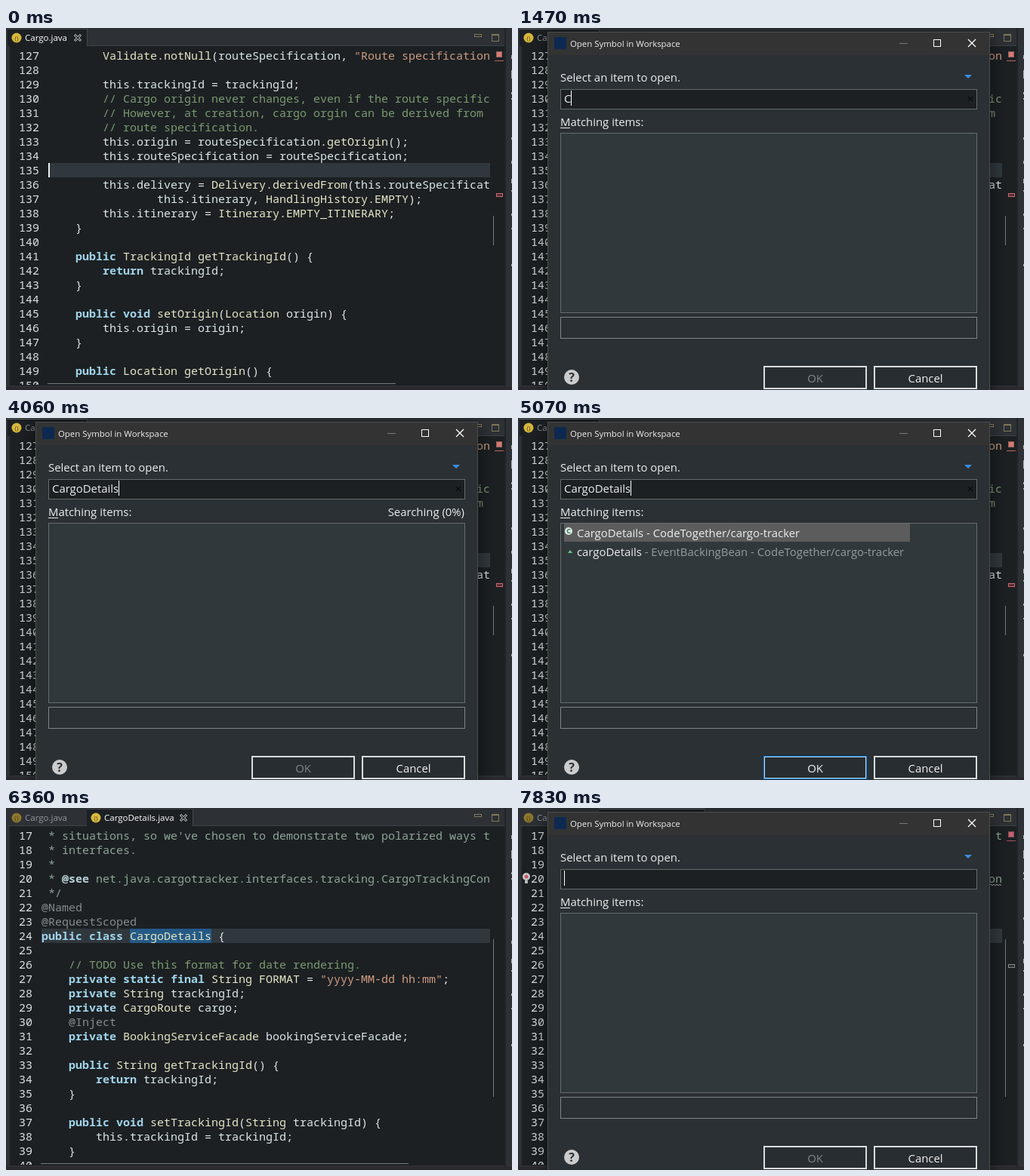
Recreate the animation shown at these times as an HTML page with a canvas. Size 670 by 480 pixels, loop 8 s.

```html
<!DOCTYPE html>
<html lang="en">
<head>
<meta charset="utf-8">
<title>Open Symbol</title>
<style>
html, body { margin: 0; width: 100%; height: 100%; overflow: hidden; background: #2b2f33; }
canvas { display: block; }
</style>
</head>
<body>
<canvas id="stage" width="670" height="480"></canvas>
<script>
const LOOP = 8000, CHAR = 9, LINE = 19;
const UI = '"Open Sans", "Noto Sans", sans-serif';
const MONO = '"Noto Sans Mono", "DejaVu Sans Mono", monospace';
const WINDOW = { x: 39, y: 5, w: 586, h: 488 };

const stage = document.getElementById('stage').getContext('2d', { alpha: false });
const layer = document.createElement('canvas');
layer.width = WINDOW.w;
layer.height = WINDOW.h;
const dialog = layer.getContext('2d', { alpha: false });
let c = stage;

const cargo = {
  first: 127, x: 56, current: 135, tabs: ['Cargo.java'], active: 0,
  thumb: [249, 288], scroll: [55, 516], marker: 219,
  code: `        Validate.notNull(routeSpecification, "Route specification is required");

        this.trackingId = trackingId;
        // Cargo origin never changes, even if the route specification
        // However, at creation, cargo orgin can be derived from
        // route specification.
        this.origin = routeSpecification.getOrigin();
        this.routeSpecification = routeSpecification;

        this.delivery = Delivery.derivedFrom(this.routeSpecification,
                this.itinerary, HandlingHistory.EMPTY);
        this.itinerary = Itinerary.EMPTY_ITINERARY;
    }

    public TrackingId getTrackingId() {
        return trackingId;
    }

    public void setOrigin(Location origin) {
        this.origin = origin;
    }

    public Location getOrigin() {
`.split('\n')
};
const details = {
  first: 17, x: 47, current: 24, tabs: ['Cargo.java', 'CargoDetails.java'], active: 1,
  thumb: [174, 383], scroll: [46, 533], marker: 207,
  code: ` * situations, so we've chosen to demonstrate two polarized ways to
 * interfaces.
 *
 * @see net.java.cargotracker.interfaces.tracking.CargoTrackingConverter
 */
@Named
@RequestScoped
public class CargoDetails {

    // TODO Use this format for date rendering.
    private static final String FORMAT = "yyyy-MM-dd hh:mm";
    private String trackingId;
    private CargoRoute cargo;
    @Inject
    private BookingServiceFacade bookingServiceFacade;

    public String getTrackingId() {
        return trackingId;
    }

    public void setTrackingId(String trackingId) {
        this.trackingId = trackingId;
    }
`.split('\n')
};

// The first matching rule colours each token.
const rules = [
  [/^\/\/.*/, '#7b9a70'],
  [/^ \*.*/, '#8fa596'],
  [/^".*?("|$)/, '#ce9b80'],
  [/^@\w+/, '#858b8d'],
  [/^(public|private|static|final|class|void|return)\b/, '#a0d4ea', true],
  [/^[A-Z]\w*/, '#e4e6c4'],
  [/^\w+(?=\()/, '#e6e6c6'],
  [/^\w+/, '#dde6ea'],
  [/^[^\w"@/]+|^./, '#e2e6e6']
];

function fill(color, x, y, w, h) {
  c.fillStyle = color;
  c.fillRect(x, y, w, h);
}
function box(color, x, y, w, h, background) {
  if (background) fill(background, x, y, w, h);
  c.strokeStyle = color;
  c.lineWidth = 1;
  c.strokeRect(x + .5, y + .5, w - 1, h - 1);
}
function text(value, x, y, color = '#eceeef', font = `14.9px ${UI}`, align = 'left') {
  c.font = font;
  c.textAlign = align;
  c.fillStyle = color;
  c.fillText(value, x, y);
}
function disc(color, x, y, r) {
  c.fillStyle = color;
  c.beginPath();
  c.arc(x, y, r, 0, 7);
  c.fill();
}
function path(color, points, width = 1) {
  c.strokeStyle = color;
  c.lineWidth = width;
  c.beginPath();
  points.forEach(([x, y]) => c.lineTo(x, y));
  c.stroke();
}
function cross(color, x, y, r, width) {
  path(color, [[x - r, y - r], [x + r, y + r]], width);
  path(color, [[x + r, y - r], [x - r, y + r]], width);
}
function triangle(color, x, y, w, h) {
  c.fillStyle = color;
  c.beginPath();
  c.moveTo(x - w, y);
  c.lineTo(x + w, y);
  c.lineTo(x, y + h);
  c.fill();
}

function drawCodeLine(line, x, y) {
  let col = 0;
  while (col < line.length) {
    const rest = line.slice(col);
    const [pattern, color, bold] = rules.find(([p]) => p.test(rest));
    const token = rest.match(pattern)[0];
    text(token, x + col * CHAR, y, color, `${bold ? 'bold ' : ''}15px ${MONO}`);
    col += token.length;
  }
}

function drawTabs(editor, focused) {
  fill('#3c4246', 2, 23, 658, 1);
  editor.tabs.forEach((name, i) => {
    const x = i ? 107 : 2, w = i ? 140 : 105, on = i === editor.active;
    if (on) {
      fill('#1c2023', x, 1, w, 23);
      fill(focused ? '#3c4246' : '#5b6063', x, 1, w, 1);
      fill('#43484c', x + w, 1, 1, 23);
    }
    disc(on ? '#d8b83c' : '#8c762d', x + 12, 13, 6.5);
    text('{}', x + 12, 16, '#4a401c', `7px ${UI}`, 'center');
    text(name, x + 23, 17, on && focused ? '#ffffff' : '#92989c', `11.5px ${UI}`);
    if (on) {
      cross('#d0d4d6', x + w - 12, 13, 4, 3);
      cross('#1c2023', x + w - 12, 13, 3.5, 1.2);
    }
  });
  box('#827957', 620, 8, 10, 4);
  box('#827957', 643, 8, 10, 10);
  fill('#827957', 643, 9, 10, 1);
}

function drawMarkers(editor, gray) {
  box(gray ? '#8a4a55' : '#96605b', 649, 31, 8, 8, gray ? '#c4626e' : '#d77b70');
  fill(gray ? '#a44f5c' : '#c2655f', 647, 43, 12, 1);
  box(gray ? '#858a8d' : '#cf6b70', 649, editor.marker, 9, 5, gray ? '#2c3033' : '#542c32');
}

function drawEditor(editor, t, focused) {
  fill('#2d3135', 0, 0, 670, 480);
  fill('#2b292e', 0, 476, 670, 4);
  fill('#1c2023', 5, 24, 655, 450);
  fill('#202427', 660, 0, 2, 476);
  drawTabs(editor, focused);
  for (const [y, h] of [[36, 5], [56, 11], [85, 3], [93, 2], [145, 3], [176, 4], [200, 6], [215, 2], [246, 3], [265, 2], [313, 3]])
    fill('#aeb3b5', 669, y, 1, h);

  c.save();
  c.beginPath();
  c.rect(5, 24, 636, 449);
  c.clip();
  const top = 27 + (editor.current - editor.first) * LINE;
  fill('#30383e', editor.x, top, 641 - editor.x, LINE);
  if (editor === details) fill('#255a86', 164, top, 108, LINE);
  editor.code.forEach((line, i) => {
    const y = 42 + i * LINE;
    text(editor.first + i, 17, y, '#dde1e0', `15px ${MONO}`);
    drawCodeLine(line, editor.x, y);
  });
  if (editor === details)
    text('@see', editor.x + 3 * CHAR, 42 + 3 * LINE, '#b4cbd4', `bold 15px ${MONO}`);
  if (editor === cargo && t < 270) fill('#eeeeee', 56, top, 2, LINE);
  c.restore();

  fill('#747a7d', 645, editor.thumb[0], 1, editor.thumb[1] - editor.thumb[0]);
  fill('#747a7d', editor.scroll[0], 471, editor.scroll[1] - editor.scroll[0], 1);
  if (editor === cargo) drawMarkers(editor);
  else if (t >= 7630) {
    drawMarkers(editor, true);
    disc('#c9cccd', 11, 91, 5);
    disc('#cc5661', 11, 91, 2.5);
    fill('#b4b8ba', 9, 96, 4, 4);
    path('#a0a5a7', Array.from({ length: 10 }, (_, i) => [622 + i * 2, 101 + i % 2 * 2]));
  }
}

// Each typed state begins at its time.
const typing = [
  [1470, 1], [1670, 2], [1940, 3], [2140, 4], [2400, 5], [2520, 6],
  [2640, 7], [2770, 8], [2890, 9], [3010, 11], [3130, 12]
];
function typed(t) {
  const count = t < 5800 ? typing.reduce((n, [at, length]) => t >= at ? length : n, 0) : 0;
  return 'CargoDetails'.slice(0, count);
}

function drawButton(label, x, enabled) {
  box('#d9dcdd', x, 448, 137, 31, '#282d31');
  box('#d9dcdd', x + 1, 449, 135, 29);
  text(label, x + 68.5, 470, enabled ? '#f2f2f2' : '#818487', undefined, 'center');
}

function drawResults(t) {
  fill('#5c5c5c', 61, 140, 458, 24);
  disc('#e4ebe6', 67, 150, 5);
  text('C', 67, 153, '#267a4c', `bold 9px ${UI}`, 'center');
  triangle('#6cc58b', 69, 179, 3, -4);
  text('CargoDetails - CodeTogether/cargo-tracker', 78, 158);
  text('cargoDetails', 78, 183);
  text(' - EventBackingBean - CodeTogether/cargo-tracker', 78 + c.measureText('cargoDetails').width, 183, '#949da2');
  drawButton('OK', 325, true);
  c.globalAlpha = Math.min(1, (Math.floor((t - 4590) / 80) + 1) / 7);
  box('#0c7bdb', 325, 448, 137, 31);
  box('#b9dcf8', 326, 449, 135, 29);
  c.globalAlpha = 1;
}

function drawDialog(t) {
  c = dialog;
  c.save();
  c.translate(-WINDOW.x, -WINDOW.y);
  fill('#2b3034', WINDOW.x, WINDOW.y, WINDOW.w, WINDOW.h);
  fill('#333333', 39, 5, 586, 31);
  box('#4a4d4f', WINDOW.x, WINDOW.y, WINDOW.w, WINDOW.h);
  fill('#0d2950', 48, 12, 16, 16);
  text('Open Symbol in Workspace', 69, 24.5, '#f0f0f0', `11.4px ${UI}`);
  fill('#77797a', 505, 20, 11, 1);
  box('#ffffff', 550, 15, 10, 10);
  cross('#ffffff', 601, 20, 5, 1.2);

  text('Select an item to open.', 56, 71);
  triangle('#3c8ddd', 596, 62, 5, 5);
  box('#666b6e', 56, 81, 552, 27, '#1c2022');
  const query = typed(t);
  text(query, 61, 99);
  fill('#ffffff', 61 + Math.round(c.measureText(query).width), 83, 1, 20);
  if (query) cross('#0b0d0e', 599, 94, 3, 1.5);

  text('Matching items:', 56, 130);
  fill('#eceeef', 56, 132, 13, 1);
  if (t >= 1740 && t < 4590)
    text(`${t >= 2140 && t < 4060 ? 'Items filtering' : 'Searching'} (0%)`, 607, 130, '#eceeef', undefined, 'right');
  box('#666c6f', 56, 139, 552, 239, '#31383b');
  box('#7f8487', 56, 383, 552, 29);

  disc('#cccccc', 71, 463, 10);
  text('?', 71, 469, '#2b3034', `bold 16px ${UI}`, 'center');
  drawButton('Cancel', 471, true);
  if (t >= 4590 && t < 5800) drawResults(t);
  else drawButton('OK', 325, false);
  c.restore();
  c = stage;
}

function visibility(t) {
  const step = (start, count) => Math.min(1, Math.max(0, (Math.floor((t - start) / 69.9) + 1) / count));
  if (t >= 7630) return t >= 7830 ? 1 : step(7630, 4);
  if (t >= 5420) return 1 - step(5420, 5);
  return step(270, 5);
}

function render(t) {
  const shown = visibility(t);
  drawEditor(t < 6290 ? cargo : details, t, shown === 0);
  if (!shown) return;
  drawDialog(t);
  const eased = 1 - (1 - shown) ** 2;
  const scale = .92 + .08 * eased;
  c.save();
  c.globalAlpha = eased;
  c.shadowColor = 'rgba(0,0,0,.55)';
  c.shadowBlur = 22;
  c.shadowOffsetY = 4;
  c.translate(WINDOW.x + WINDOW.w / 2, WINDOW.y + WINDOW.h / 2);
  c.scale(scale, scale);
  c.drawImage(layer, -WINDOW.w / 2, -WINDOW.h / 2);
  c.restore();
}

const start = performance.now();
function frame() {
  render((performance.now() - start) % LOOP);
  requestAnimationFrame(frame);
}
frame();
</script>
</body>
</html>
```
